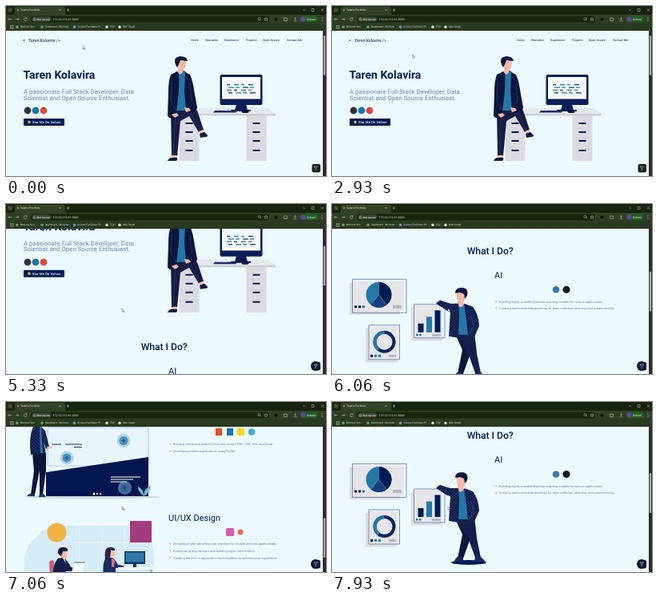
An HTML page for the animation above (8000 ms loop, 400x213 px).

```html
<!DOCTYPE html>
<html lang="en">
<head>
<meta charset="utf-8">
<title>Portfolio</title>
<style>
html, body { margin: 0; width: 100%; height: 100%; overflow: hidden; background: #edf9fe; }
svg { display: block; width: 100%; height: 100%; }
text { font-family: Roboto, Arial, sans-serif; text-rendering: geometricPrecision; }
.navy { fill: #001c55; }
.ink { fill: #0c153c; }
.blue { fill: #2378a8; }
.skin { fill: #f3b9a6; }
.line { fill: none; stroke: #4a669b; stroke-width: .7; }
.nav { font-size: 3.65px; fill: #101a3c; }
.h2 { font-size: 11px; fill: #001c55; }
.li { font-size: 3.95px; fill: #7685a2; }
.bm { font-size: 3.2px; fill: #dbe3d5; }
.icon { fill: none; stroke: #c5cfbf; stroke-width: .5; }
</style>
</head>
<body>
<svg viewBox="0 0 400 213" preserveAspectRatio="none">
<defs>
  <pattern id="dots" width="4" height="4" patternUnits="userSpaceOnUse">
    <rect width="4" height="4" fill="#101a4c"/>
    <circle cx="1" cy="1" r=".45" fill="#7f9cc4"/><circle cx="3" cy="3" r=".45" fill="#7f9cc4"/>
  </pattern>
  <linearGradient id="bar" x2="0" y2="1">
    <stop offset="0" stop-color="#35452a"/><stop offset="1" stop-color="#283820"/>
  </linearGradient>
  <g id="drawers">
    <rect width="25" height="57" fill="#dcdce0"/>
    <path d="M2 3h21M2 16h21M2 29h21M2 42h21" stroke="#c9c9cf" stroke-width=".5"/>
    <path d="M8 9h9v2H8zM8 20h9v2H8zM8 31h9v2H8zM8 43h9v2H8z" class="navy"/>
  </g>
  <g id="bubble">
    <circle r="8.500" fill="#9ccbe3" opacity=".75"/><circle r="5.500" fill="#4b93bf"/>
    <path d="M-3 0h6M0-3v6" stroke="#154478" stroke-width=".8"/>
  </g>
</defs>

<rect width="400" height="213" fill="#ecf9fe"/>
<g id="page">
  <!-- header -->
  <text x="21" y="44.500" font-size="6" class="ink">&lt;</text>
  <text x="28" y="45" font-size="5.300" class="ink" style="font-family:'Noto Serif',serif;font-style:italic" letter-spacing="-.25">Taren Kolavira</text>
  <text x="63" y="44.500" font-size="5" class="ink">/&gt;</text>
  <g id="nav"></g>

  <!-- hero -->
  <text x="21.500" y="91.300" font-size="14" font-weight="700" class="navy">Taren Kolavira</text>
  <g font-size="7.600" fill="#8091b0" stroke="#8091b0" stroke-width=".12" letter-spacing=".13">
    <text x="22" y="110">A passionate Full Stack Developer, Data</text>
    <text x="22" y="117.600">Scientist and Open Source Enthusiast.</text>
  </g>
  <circle cx="27" cy="131" r="4.400" fill="#303237"/>
  <circle cx="37" cy="131" r="4.400" fill="#1479ad"/>
  <circle cx="47" cy="131" r="4.400" fill="#df483b"/>
  <rect x="22" y="141" width="51" height="9" rx=".8" class="navy"/>
  <path d="M29 143l.7 1.500 1.600.2-1.200 1.200.3 1.600-1.400-.8-1.400.8.3-1.600-1.200-1.200 1.600-.2z" fill="#ffc83d"/>
  <text x="33" y="147" font-size="4" font-weight="500" fill="#fff" letter-spacing=".14">Star Me On Velnox</text>

  <!-- desk and monitor -->
  <use href="#drawers" x="216.500" y="137"/>
  <use href="#drawers" x="300.500" y="137"/>
  <path d="M218 130h16l3-2h90l10 7v2H218z" fill="#e7e7ec"/>
  <path d="M218 135h119v2.500H218z" fill="#cfd1d8"/>
  <path d="M288 123h12l2 8h-16z" fill="#0b1d56"/>
  <rect x="281" y="130" width="25" height="2" rx="1" class="ink"/>
  <rect x="267.500" y="86" width="53" height="38" rx="2" fill="#0b1d56"/>
  <rect x="270" y="89" width="48" height="27.500" fill="#f5f8fc"/>
  <g id="code"></g>
  <path d="M261 131h28l-2 2.500h-28z" fill="#1a2c62"/>
  <ellipse cx="299" cy="132.500" rx="4.500" ry="1.500" class="ink"/>

  <!-- seated man -->
  <path d="M206 130l22-4q10 0 12 8l7 21-6 3-12-20-11 6-4 44h-7z" fill="#151d45"/>
  <path d="M212 138l-3 46M222 134l10 1 10 20" fill="none" stroke="#31406f" stroke-width=".5"/>
  <path d="M207.500 187h6v4h-6zM241 157l5-2 2 4-4 2z" class="skin"/>
  <path d="M206 190h8q1 4-2 4h-10q1-3 4-4zM242 160l6-2 4 4q0 2-3 2l-6 1z" class="ink"/>
  <path d="M212 84l4-3h7l4 4 1 46h-18z" class="blue"/>
  <path d="M215 76h6v7q-3 5-6 0z" class="skin"/>
  <path d="M213 68q0-3 6-3t6 5l-1 8q-4 5-8 1z" class="skin"/>
  <path d="M211 70q-1-6 7-7 8 0 9 6l-9-1-2 5-2 4q-2-2-3-7z" class="ink"/>
  <path d="M214 82l-8 4q-3 8-3 21l-1 31q4 5 10 2l3-24q2-18 1-31zM224 83l6 3q4 9 6 25l3 16q-1 6-5 6l-9-3-2-22z" class="ink"/>
  <path d="M207 96l-1 23 7 13M230 97l2 22-7 8" fill="none" stroke="#34446e" stroke-width=".6"/>
  <path d="M207 136l6-2 3 3-5 3zM223 127l6 1 2 3-6 2z" class="skin"/>

  <!-- what I do -->
  <g transform="translate(0 195)">
    <text x="197.700" y="46" font-size="12.100" font-weight="500" class="navy" text-anchor="middle">What I Do?</text>
    <g id="ai"></g>
    <circle cx="280" cy="90.500" r="4.300" fill="#397aab"/>
    <circle cx="293" cy="90.500" r="4.500" fill="#16191d"/>

    <g fill="#dddee2">
      <rect x="22" y="82" width="63" height="40"/>
      <rect x="99" y="112.500" width="39" height="42"/>
      <rect x="42" y="138.500" width="40" height="43"/>
    </g>
    <g fill="#e6e6e9">
      <rect x="26" y="80" width="64" height="38"/>
      <rect x="102" y="110.500" width="36" height="41"/>
      <rect x="45" y="136.500" width="37" height="42"/>
    </g>
    <path class="line" d="M25.500 77.500h67.500v42H25.500zM102.500 109h38.500v42h-38.500zM46 135h38.500v43H46z"/>
    <circle cx="58.500" cy="97" r="16" class="blue"/>
    <path d="M58.500 97V81a16 16 0 0 1 10 28.500z" class="navy"/>
    <path d="M58.500 97l10 12.500a16 16 0 0 1-20 0z" fill="#14407c"/>
    <path d="M58.500 81v16l10 12.500M58.500 97l-10 12.500" fill="none" stroke="#9db5cf" stroke-width=".4"/>
    <circle cx="65.500" cy="156" r="12" fill="none" stroke="#0b2461" stroke-width="4"/>
    <path d="M65.500 144a12 12 0 0 0-7 21.700" fill="none" stroke="#2378a8" stroke-width="4"/>
    <path d="M28 110.500h3v3h-3zM33 110.500h3v3h-3zM48 172h3v3h-3z" class="navy"/>
    <path d="M38 110.500h3v3h-3zM53 172h3v3h-3zM58 172h3v3h-3z" class="blue"/>
    <path d="M76 110h11v4H76zM71 172h9v3h-9zM125 146h11v3h-11z" fill="#b3b8c2"/>
    <path d="M107.500 133h7v11h-7zM128.500 116.500h7v27.500h-7z" class="navy"/>
    <path d="M118 124.500h7V144h-7z" class="blue"/>
    <path d="M105 146h2.500v2.500H105zM109 146h2.500v2.500H109z" class="blue"/>

    <!-- leaning man -->
    <ellipse cx="171" cy="201" rx="22" ry="3" class="navy"/>
    <path d="M153 144h25l-2 18-12 34h-7l6-30z" class="ink"/>
    <path d="M155 144h23q2 16 3 27l5 24h-7l-9-25-13-20z" fill="#131f4d"/>
    <path d="M157 194h7v6h-11q0-3 4-6zM179 194h7l5 5v1h-13z" fill="#162a62"/>
    <path d="M156 109h13l4 38h-17z" class="blue"/>
    <path d="M157 105h7v6q-4 3-7-1zM129 106l6-3 4 2-5 4z" class="skin"/>
    <path d="M155 94q6-3 11 1v9q-4 6-9 2z" class="skin"/>
    <path d="M154 95q0-7 8-7 9 0 7 10l-3 4-1-6-5-2z" class="ink"/>
    <path d="M158 108l-10 0-13-4-5 4 14 9 4 1-2 31 12 2 1-28zM165 108l11 4q7 9 8 24l-6 14-8 1-2-22z" fill="url(#dots)"/>
    <path d="M174 124l3 11-5 12" fill="none" stroke="#3b5688" stroke-width=".6"/>
  </g>

  <!-- full stack and design -->
  <g transform="translate(0 405)">
    <g id="full"></g>
    <rect x="262" y="33" width="8" height="9" fill="#e44d26"/>
    <rect x="276" y="33" width="8" height="9" fill="#1b73ba"/>
    <rect x="289" y="33" width="9" height="9" fill="#f0d91d"/>
    <circle cx="307" cy="37.500" r="4.300" fill="#3fa9dc"/>

    <ellipse cx="108" cy="119" rx="85" ry="2.200" fill="#ccd8e0"/>
    <path d="M52 32h126v48H52z" fill="#e8f6fc" stroke="#8298b8" stroke-width=".5"/>
    <path d="M50 88l128-19v49H50z" fill="#04164f"/>
    <path d="M74 53h21M85 56.500h10M57 53h12" stroke="#14366f" stroke-width="1.200"/>
    <path d="M131 94h37M131 97h28M131 100h20" stroke="#fff" stroke-width="1"/>
    <use href="#bubble" x="76" y="70"/><use href="#bubble" x="147" y="48.500"/>
    <use href="#bubble" x="148.500" y="107.500" opacity=".65"/>
    <g fill="#fff"><circle cx="110" cy="115" r="1.500"/><circle cx="114" cy="115" r="1.100"/><circle cx="118" cy="115" r="1.100"/></g>
    <path d="M172 118q-8-7-7-12 7 3 7 12 0-10 9-13-1 9-9 13" fill="#78b2cd"/>
    <path d="M33 64h17l0 22-4 30h-4l0-30-6 30h-5l4-30z" class="ink"/>
    <path d="M30 115h6v3H26q1-2 4-3zM42 115h5l3 4h-9z" fill="#22386c"/>
    <path d="M36 24h7v9h-7z" class="skin"/>
    <path d="M35 18q5-5 10 0v8q-4 5-8 2z" class="skin"/>
    <path d="M33 21q-1-9 7-8 8 0 6 6l-8 1-2 6z" class="ink"/>
    <path d="M40 31h4l4 33h-7z" class="blue"/>
    <path d="M34 31h8l1 34-12 1q-3-22 3-35zM44 31l5 5 5 20-4 3-3-9 3 15h-4z" fill="url(#dots)"/>
    <path d="M51 56l6-1 1 3-6 1z" class="skin"/>

    <g id="design"></g>
    <rect x="275" y="158" width="10" height="10" rx="1.500" fill="#d45cab"/>
    <circle cx="293" cy="163" r="3.500" fill="#ef6c4d"/>

    <path d="M23 213q-2-32 14-43 12-15 32-15h84q30 3 31 30 3 14-1 28z" fill="#d6ecf6"/>
    <path d="M92 156v45M120 156v45M148 158v40M84 176h88" stroke="#e8f5fb" stroke-width="1"/>
    <circle cx="63.500" cy="163.500" r="12" fill="#f2b545"/>
    <rect x="155" y="149" width="27" height="27" fill="#a23c7c"/>
    <!-- workers -->
    <path d="M54 202q0-4 5-4l4 18h-8z" fill="#c85e75"/>
    <path d="M68 186q5-3 8 1v8q-3 4-7 1z" class="skin"/>
    <path d="M65 190q-1-8 6-8 7 0 6 5l-6 0-2 6z" class="ink"/>
    <path d="M65 196l7-1q6 5 9 12l9 1v4l-15 0v20H58q-1-28 7-36z" fill="#121f4c"/>
    <path d="M71 195l2 0 2 8z" fill="#fff"/>
    <path d="M85 200h14l-3 14H82z" fill="#f5fafd"/><path d="M85 200h14l-.4 2H84.600z" fill="#98aabd"/>
    <path d="M128 184q5-3 8 1v7q-3 4-7 1z" class="skin"/>
    <path d="M124 197q-2-15 6-15 7 0 6 4l-5 0-1 11z" fill="#2e2349"/>
    <path d="M125 195h8q5 4 7 9l7 1v3h-10v12h-15q-2-19 3-25z" fill="#1b2c60"/>
    <path d="M132 195l4 4-1 8-3-1z" fill="#d97386"/>
    <path d="M148 187h26v16h-26z" fill="#0f3266"/><path d="M149.500 188.500h23v12h-23z" fill="#2f78aa"/>
    <path d="M159 203h4v4h-4z" fill="#183362"/>
    <path d="M140 207h44v2.500h-44zM74 213h40v2H74z" fill="#f8fbfd"/>
    <path d="M46 217h4v40h-4zM180 210h3v47h-3z" fill="#9db4c7"/>
  </g>
</g>

<!-- page scrollbar and buttons -->
<rect x="396" y="31" width="4" height="182" fill="#2a2d2a"/>
<rect id="thumb" x="396.800" y="37" width="2.400" height="50" rx="1.200" fill="#a3a7a1"/>
<rect x="382.500" y="198" width="10.500" height="10.500" rx="2" fill="#18211b"/>
<circle id="top" cx="387" cy="203" r="6" fill="#0e1836"/>
<path d="M385 201h4.500l-2.500 3zM386 205.300h2.500" fill="none" stroke="#a9b3b4" stroke-width=".7"/>

<!-- browser -->
<rect width="400" height="31" fill="#17240f"/>
<path d="M0 11H9q2 0 2-2V4q0-3 3-3h57q3 0 3 3v5q0 2 2 2h324v20H0z" fill="url(#bar)"/>
<rect x="2" y="2" width="6" height="6" rx="1.500" fill="#32432a"/>
<path class="icon" d="M4 4.500l1 1 1-1M66.500 4l2 2m0-2l-2 2M75.500 5h4m-2-2v4M371 5h3M382 3.500h3v3h-3zM394 3.500l3 3m0-3l-3 3M7 16.500H3m1.500-1.500L3 16.500 4.500 18M12 16.500h4m-1.500-1.500l1.500 1.500-1.500 1.500M26 15.500a2 2 0 1 0 .2 1.700m-.2-3v1.500h-1.500"/>
<circle cx="15" cy="5" r="1.200" fill="#c96a55"/>
<text x="18" y="6.200" font-size="3.400" fill="#f1f5ec">Taren's Portfolio</text>
<rect x="31" y="12.500" width="298" height="8" rx="4" fill="#19260f"/>
<rect x="32.500" y="13.500" width="24" height="6" rx="3" fill="#3c4936"/>
<path d="M35.500 14.800l1.600 3h-3.200z" class="icon"/>
<text x="38.500" y="17.700" font-size="3.400" fill="#fff">Not secure</text>
<text x="58.500" y="17.800" font-size="3.600" fill="#e9eee5">172.22.212.61:3000</text>
<circle cx="316.500" cy="16" r="1.500" class="icon"/><path d="M317.600 17.200l1.200 1.200" class="icon"/>
<path d="M325 14.300l.7 1.400 1.500.2-1.100 1 .3 1.500-1.400-.8-1.400.8.3-1.500-1.100-1 1.500-.2z" class="icon"/>
<circle cx="337.500" cy="16.500" r="2" fill="#10150f"/>
<path class="icon" d="M347.500 15h4v3.500h-4zM361.500 14v3m-1.300-1.200l1.300 1.300 1.300-1.300M359.500 18.700h4"/>
<rect x="367.500" y="12.300" width="22" height="8" rx="4" fill="#245e25"/>
<circle cx="371.700" cy="16.300" r="2.800" fill="#6f3cae"/>
<text x="376" y="17.600" font-size="3.600" fill="#e7f7e1">School</text>
<g fill="#d5ddd0"><circle cx="395" cy="14.500" r=".5"/><circle cx="395" cy="16.500" r=".5"/><circle cx="395" cy="18.500" r=".5"/></g>
<path class="icon" d="M5.500 24.500h1.200v1.200H5.500zM8 24.500h1.200v1.200H8zM5.500 27h1.200v1.200H5.500zM8 27h1.200v1.200H8z"/>
<g id="marks"></g>

<path id="cursor" d="M0 0v4l1-.9.8 1.700.7-.3-.8-1.700h1.300z" fill="#fff" stroke="#222" stroke-width=".35"/>
</svg>
<script>
const $ = id => document.getElementById(id);
const text = (x, y, cls, s) => `<text x="${x}" y="${y}" class="${cls}">${s}</text>`;

$('nav').innerHTML = [[231, 'Home'], [249, 'Education'], [273, 'Experience'], [300, 'Projects'],
  [321, 'Open Source'], [351, 'Contact Me']].map(([x, s]) => text(x, 43.5, 'nav', s)).join('');

$('marks').innerHTML = [[14, '#57a960', 'Morlune Ven'], [45, '#3fb57b', 'Dashboard - Morlune...'],
  [85.5, '#52a5d8', 'Access Facilitator Pr...'], [126, '#dce5d9', 'TQV'], [142, '#dce5d9', 'Web Graph']]
  .map(([x, c, s]) => `<circle cx="${x}" cy="26.200" r="1.700" fill="${c}"/>` + text(x + 3.7, 27.4, 'bm', s)).join('');

// four rows of code on the monitor
let rows = '';
for (let r = 0; r < 4; r++) {
  for (let c = 0; c < 4; c++) {
    const x = 276 + c * 9 + r % 2 * 2, w = 4 + (r * 3 + c * 2) % 4;
    rows += `<rect x="${x}" y="${98 + r * 3.4}" width="${w}" height="1.300" fill="${(r + c) % 3 ? '#2679ab' : '#173a78'}"/>`;
  }
}
$('code').innerHTML = rows;

function section(id, y, title, items) {
  $(id).innerHTML = text(203, y + 4, 'h2', title) + items.map((s, i) => {
    const row = y + 33.5 + i * 8.6;
    return `<path d="M205.400 ${row - 1.8}l-1.200 2h1l-.6 1.800 1.800-2.500h-1z" fill="#f29a4a"/>` + text(209, row + 1.3, 'li', s);
  }).join('');
}
section('ai', 72, 'AI', [
  'Building highly scalable Machine Learning models for various applications',
  'Creating end-to-end data pipelines for data collection, cleaning, and preprocessing']);
section('full', 19.5, 'Full Stack Development', [
  'Building responsive website front end using HTML, CSS, and JavaScript',
  'Developing mobile applications using Flutter']);
section('design', 144.5, 'UI/UX Design', [
  'Designing highly attractive user interface for mobile and web applications',
  'Customizing logo designs and building logos from scratch',
  'Creating the flow of application functionalities to optimize user experience']);

// keys: [ms, value, slope per ms], joined by cubic curves
function curve(keys, t) {
  const n = keys.findIndex(k => k[0] > t);
  if (n === 0) return keys[0][1];
  if (n < 0) return keys[keys.length - 1][1];
  const [t0, a, m0 = 0] = keys[n - 1], [t1, b, m1 = 0] = keys[n];
  const d = t1 - t0, u = (t - t0) / d, v = 1 - u;
  return a * v * v * (1 + 2 * u) + b * u * u * (3 - 2 * u) + d * u * v * (m0 * v - m1 * u);
}

const scroll = [[4650, 0], [5330, 58, .14], [6060, 178, .2], [6950, 405], [7100, 405], [7930, 195]];
const mouseX = [[300, 96], [1300, 92], [2700, 92], [3600, 145]];
const mouseY = [[300, 50], [1300, 47], [2700, 47], [3600, 131]];

function draw(t) {
  const y = curve(scroll, t);
  $('page').setAttribute('transform', `translate(0 ${-y})`);
  $('thumb').setAttribute('y', 37 + y * .267);
  $('top').setAttribute('opacity', y > 4 ? 1 : 0);
  $('cursor').setAttribute('transform', `translate(${curve(mouseX, t)} ${curve(mouseY, t)})`);
}

const start = performance.now();
function tick() {
  draw((performance.now() - start) % 8000);
  requestAnimationFrame(tick);
}
tick();
</script>
</body>
</html>
```
